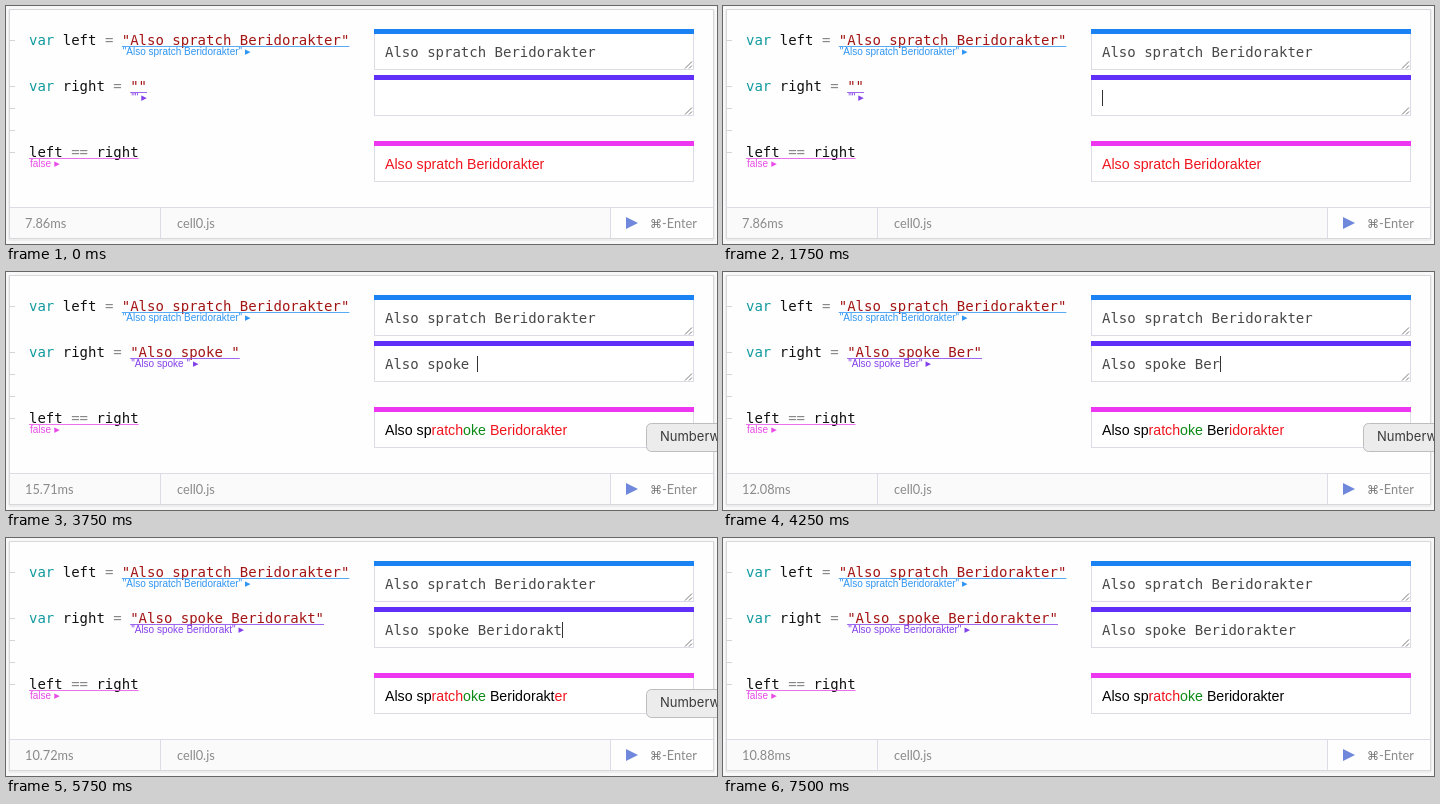
An HTML page for the animation above (7.75 s loop, 711 by 238 pixels).

```html
<!DOCTYPE html>
<html lang="en">
<head>
<meta charset="utf-8">
<title>Live text comparison</title>
<style>
  html, body { margin: 0; width: 100%; height: 100%; overflow: hidden; background: #f8f8f8; }
  svg { display: block; width: 711px; height: 238px; }
  text { white-space: pre; }
  .code { font: 14px "DejaVu Sans Mono", monospace; }
  .label { font: 10px "Liberation Sans", sans-serif; }
  .arrow { font: 11px "DejaVu Sans", sans-serif; }
  .diff { font: 14.2px "Liberation Sans", sans-serif; }
  .status { font: 12.75px Lato, sans-serif; fill: #8a8a8a; }
  .command { font: 12px "DejaVu Sans", sans-serif; }
  .tip { font: 13px Inter, sans-serif; fill: #3a3a3a; }
</style>
</head>
<body>
<svg id="stage" viewBox="0 0 711 238"></svg>
<script>
const LOOP = 7750;
const CHAR = 8.43;
const NAME = "Beridorakter";
const LEFT = "Also spratch " + NAME;
const RIGHT = "Also spoke " + NAME;
const SHARED = "Also sp".length;
const BLUE = "#1a82f2", PURPLE = "#6030f8", PINK = "#ec36ef";

// Start time, characters typed, evaluation time shown in the footer
const STEPS = [
  [0, 0, "7.86"], [2750, 2, "16.31"], [3000, 4, "12.47"], [3250, 6, "14.02"],
  [3500, 9, "13.35"], [3750, 11, "15.71"], [4000, 13, "11.26"], [4250, 14, "12.08"],
  [4500, 16, "10.64"], [4750, 18, "10.01"], [5250, 20, "11.43"], [5750, 21, "10.72"],
  [6000, 22, "11.17"], [6250, 23, "10.88"]
];

const rect = (x, y, w, h, fill, extra = "") =>
  `<rect x="${x}" y="${y}" width="${w}" height="${h}" fill="${fill}" ${extra}/>`;
const text = (cls, x, y, content) => `<text class="${cls}" x="${x}" y="${y}">${content}</text>`;
const span = (fill, content) => content ? `<tspan fill="${fill}">${content}</tspan>` : "";

function annotation(x, baseline, chars, color, value) {
  return rect(x, baseline + 1, chars * CHAR, 1, color, 'opacity=".8"') +
    `<g fill="${color}">` +
    text("label", x + 1, baseline + 10, `${value}<tspan class="arrow" dx="3">▸</tspan>`) + "</g>";
}

function declaration(name, value, baseline, color) {
  const intro = `var ${name} = `;
  return text("code", 23, baseline,
      span("#119a9f", "var") + span("#111", ` ${name} `) + span("#888", "= ") +
      span("#a31515", `"${value}"`)) +
    annotation(23 + intro.length * CHAR, baseline, value.length + 2, color, `"${value}"`);
}

function box(y, color, resizable) {
  const frame = rect(368.5, y + .5, 319, 40, "#fff", 'stroke="#dcdce6"') + rect(368, y, 320, 5, color);
  const grip = `<path d="M679 ${y + 39.5}l7-7m-3 7l3-3" stroke="#777" fill="none"/>`;
  return frame + (resizable ? grip : "");
}

function comparison(typed) {
  const wordStart = RIGHT.indexOf(" ", SHARED);
  const leftWord = LEFT.indexOf(" ", SHARED);
  const count = typed.length;
  if (count <= SHARED) return span("#000", typed) + span("#f0141e", LEFT.slice(count));
  if (count <= wordStart) {
    return span("#000", LEFT.slice(0, SHARED)) + span("#f0141e", LEFT.slice(SHARED)) +
      span("#0a8a14", typed.slice(SHARED));
  }
  const tail = typed.slice(wordStart);
  return span("#000", LEFT.slice(0, SHARED)) +
    span("#f0141e", LEFT.slice(SHARED, leftWord)) +
    span("#0a8a14", typed.slice(SHARED, wordStart)) +
    span("#000", tail) + span("#f0141e", LEFT.slice(leftWord + tail.length));
}

function caretVisible(t) {
  if (t < 2750) return t >= 750 && (t + 250) % 1000 < 500;
  return t < 6750;
}

const panel =
  rect(2, 3, 707, 232, "#ededed", 'rx="2"') +
  rect(3.5, 3.5, 704, 229, "#fefefe", 'stroke="#d8d8dc"') +
  rect(4, 202, 600, 30, "#fafafb") +
  rect(4, 201, 703, 1, "#dcdce6") +
  rect(154, 202, 1, 30, "#dcdce6") + rect(604, 202, 1, 30, "#dcdce6") +
  [34, 80, 102, 124, 146].map(y => rect(3, y, 6, 1, "#d4d4d4")).join("") +
  declaration("left", LEFT, 39, "#2f95f2") +
  text("code", 23, 151, span("#111", "left ") + span("#888", "==") + span("#111", " right")) +
  annotation(23, 151, 13, "#e84be8", "false") +
  box(23, BLUE, true) + box(69, PURPLE, true) + box(135, PINK, false) +
  `<g fill="#484848">${text("code", 379, 51, LEFT)}</g>` +
  text("status", 171, 222, "cell0.js") +
  '<path d="M620 211l12 6-12 6z" fill="#6f88dc"/>' +
  text("status", 656, 222, "-Enter") +
  `<g fill="#777">${text("command", 644, 222, "⌘")}</g>`;

const tooltip =
  rect(640.5, 151.5, 90, 28, "#ececec", 'rx="5" stroke="#bdbdbd"') +
  text("tip", 654, 169, "Numberwicks");

const stage = document.getElementById("stage");
let shown = "";

function draw(t) {
  const [, count, duration] = STEPS.findLast(([start]) => start <= t);
  const typed = RIGHT.slice(0, count);
  const markup = panel +
    declaration("right", typed, 85, "#8440ea") +
    `<g fill="#484848">${text("code", 379, 97, typed)}</g>` +
    (caretVisible(t) ? rect(Math.floor(379 + count * CHAR), 84, 1, 16, "#333") : "") +
    text("diff", 379, 163, comparison(typed)) +
    text("status", 19, 222, duration + "ms") +
    (t >= 2250 && t < 7000 ? tooltip : "");
  if (markup !== shown) stage.innerHTML = shown = markup;
}

const origin = performance.now();
function tick() {
  draw((performance.now() - origin) % LOOP);
  requestAnimationFrame(tick);
}
tick();
</script>
</body>
</html>
```
